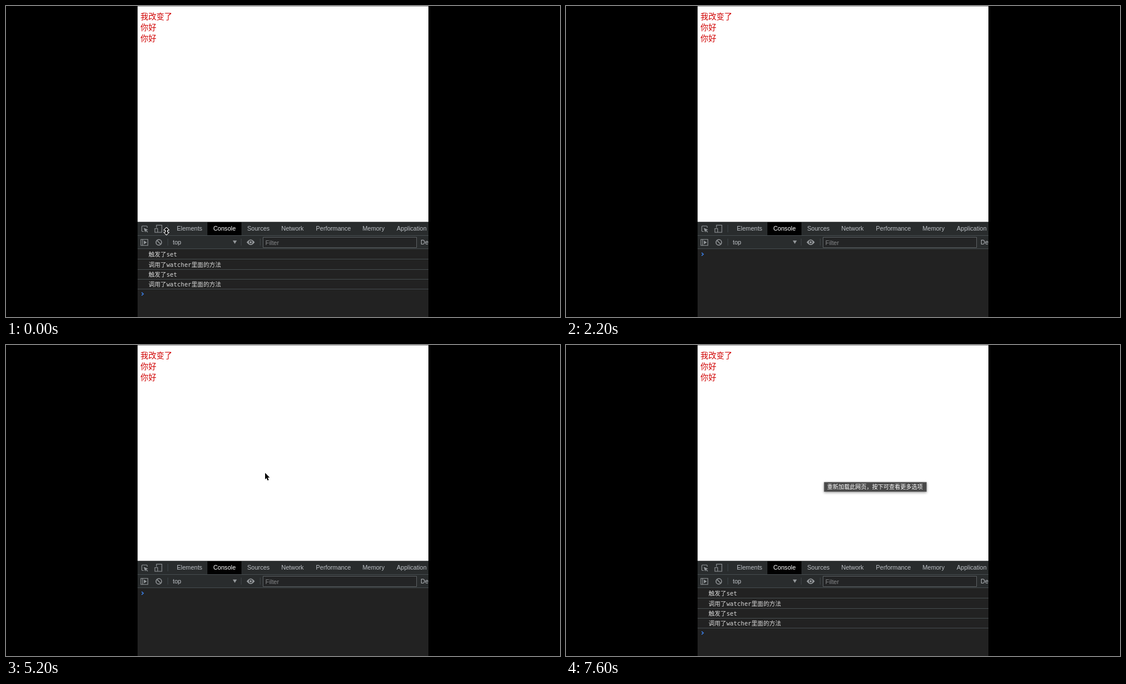
Animation of 960x540 px, one loop 8 s. Source, as an HTML page:

```html
<!DOCTYPE html>
<html lang="zh-CN">
<head>
<meta charset="utf-8">
<style>
html, body { margin: 0; width: 100%; height: 100%; overflow: hidden; background: #000; }
svg { display: block; width: 960px; height: 540px; }
text { white-space: pre; }
.page { font: 13.75px "Noto Sans CJK SC", "Noto Sans CJK", sans-serif; fill: #d00000; }
.num { font: 13.2px Inter, sans-serif; fill: #d00000; }
.ui { font: 10.6px "Liberation Sans", Arial, sans-serif; fill: #bdc1c6; }
.log { font: 10.3px "DejaVu Sans Mono", "Noto Sans CJK SC", "Noto Sans CJK", monospace; fill: #d6d6d6; }
.tip { font: 9.75px "Noto Sans CJK SC", "Noto Sans CJK", sans-serif; fill: #fff; }
.icon { fill: none; stroke: #94989b; stroke-width: 1.1; }
.line { fill: none; stroke: #454b4e; }
</style>
</head>
<body>
<svg viewBox="0 0 960 540">
  <defs>
    <clipPath id="win"><path d="M228 0H732V540H228Z"/></clipPath>
    <filter id="shade" x="-20%" y="-60%" width="140%" height="240%">
      <feDropShadow dx="0" dy="1.5" stdDeviation="2" flood-opacity=".4"/>
    </filter>
  </defs>
  <g clip-path="url(#win)">
    <path fill="#fff" d="M228 0H732V375H228Z"/>
    <path fill="#999" d="M228 0H732V1H228Z"/>
    <g id="after" class="page">
      <text x="233" y="23">我改变了</text>
      <text x="233" y="61">你好</text>
    </g>
    <g id="before">
      <text class="num" x="233" y="22.5">3;33</text>
      <text class="num" x="233" y="60.5">333</text>
    </g>
    <text class="page" x="233" y="42">你好</text>

    <path fill="#222" d="M228 375H732V540H228Z"/>
    <path fill="#292c2d" d="M228 375H732V421H228Z"/>
    <path fill="#c8c8c8" d="M228 374H732V375H228Z"/>
    <path fill="#000" d="M349 375.5H408V398H349Z"/>
    <path class="line" d="M228 398.5H732M228 421.5H732"/>
    <path class="line" stroke-width=".8" d="M280.5 380V393M280.5 404V416M407.5 404V416M440.5 404V416"/>
    <g id="tabs"></g>

    <g class="icon">
      <path d="M238.5 391.5H236.5Q235.3 391.5 235.3 390.3V383.2Q235.3 382 236.5 382H243.5Q244.7 382 244.7 383.2V385"/>
      <path fill="#94989b" stroke="none" d="M238.5 385.2L246.2 388.4 243.2 389.5 246 392.3 245 393.2 242.2 390.4 241.2 393.2Z"/>
      <path d="M260.8 385V380.5H270V393H263.5M258 386.5H262.8V393H258Z"/>
      <path d="M233.8 405.2H245.8V415.8H233.8ZM236.8 405V416"/>
      <path fill="#94989b" stroke="none" d="M239 407.3L244 410.5 239 413.7Z"/>
      <g stroke-width="1.5"><circle cx="264.8" cy="410.4" r="4.8"/><path d="M261.4 407L268.2 413.8"/></g>
      <path fill="#94989b" stroke="none" d="M393 407.2H400L396.5 413Z"/>
      <path fill="#94989b" stroke="none" d="M417 410.2Q424 400.8 431 410.2Q424 419.6 417 410.2Z"/>
      <circle cx="424" cy="410.2" r="2.5" stroke="#292c2d" stroke-width="1.2"/>
    </g>
    <text class="ui" x="289" y="413.7">top</text>
    <path fill="#232425" stroke="#5b6063" d="M445.5 401.5H711.5V419.5H445.5Z"/>
    <text class="ui" x="449.5" y="414.5" style="fill:#858789">Filter</text>
    <text class="ui" x="718.5" y="413.7">Default levels</text>

    <g id="logs"></g>
    <path id="prompt" fill="none" stroke="#3b7de0" stroke-width="1.5" d="M235 -2.6L238 0 235 2.6"/>

    <g id="tip">
      <path filter="url(#shade)" fill="#4a4a4a" stroke="#606060" stroke-width=".6" d="M447.3 238.3H624.7V254.5H447.3Z"/>
      <text class="tip" x="452.5" y="250">重新加载此网页，按下可查看更多选项</text>
    </g>

    <g stroke-linejoin="round">
      <path id="arrow" stroke="#fff" stroke-width=".9" paint-order="stroke" d="M0 0V11.2L2.5 9 4.3 13.2 6.3 12.3 4.5 8.2H8Z"/>
      <path id="resize" stroke="#fff" stroke-width="1.8" paint-order="stroke" d="M0 -6L4 -2H1V2H4L0 6 -4 2H-1V-2H-4Z"/>
      <path id="hand" fill="#fff" stroke="#111" stroke-width=".8" d="M-3 -5Q-2.6 -6.5 -1.2 -5.6L.3 -1.8Q1.5 -2.8 2.4 -1.4Q3.6 -2.2 4.3 -.8Q5.6 -1.2 5.8 .4L5.4 3.8 4.4 6.4H-1L-4.6 1.8Q-5 .2 -3.4 .5L-1.7 1.7Z"/>
    </g>
  </g>
</svg>
<script>
const $ = id => document.getElementById(id);
const show = (id, on) => $(id).setAttribute('visibility', on ? 'visible' : 'hidden');
const move = (id, x, y) => $(id).setAttribute('transform', `translate(${x} ${y})`);

const tabs = { Elements: 296, Console: 359.2, Sources: 418, Network: 477, Performance: 537, Memory: 617.7, Application: 677 };
$('tabs').innerHTML = Object.entries(tabs).map(([name, x]) =>
  `<text class="ui" x="${x}" y="390.2"${name === 'Console' ? ' style="fill:#fff"' : ''}>${name}</text>`).join('');

const messages = ['触发了set', '调用了watcher里面的方法'];
$('logs').innerHTML = [0, 1, 2, 3].map(i => {
  const y = 435.3 + i * 17.3;
  return `<text class="log" x="247" y="${y}">${messages[i % 2]}</text>
    <path class="line" d="M228 ${Math.round(y + 4) + .5}H732"/>`;
}).join('');

// Pointer stops: time, x, y
const path = [
  [0, 278, 391], [400, 278, 394], [800, 277, 412], [1000, 268, 414], [1200, 268, 414],
  [1800, 292, 6], [2000, 292, -30], [3400, 290, -30], [3600, 370, 130],
  [3800, 425.7, 215.5], [4600, 449, 222], [8000, 449, 222]
];

function pointerAt(t) {
  const i = path.findIndex(p => p[0] > t);
  const [t0, x0, y0] = path[i - 1], [t1, x1, y1] = path[i];
  const k = (t - t0) / (t1 - t0);
  return [x0 + (x1 - x0) * k, y0 + (y1 - y0) * k];
}

function draw(now) {
  const t = Math.floor(now % 8000 / 200) * 200;
  const reloaded = t >= 2600 && t < 5200;
  const logged = t < 1000 || t >= 5400;
  show('before', reloaded);
  show('after', !reloaded);
  show('logs', logged);
  move('prompt', 0, logged ? 500 : 431);
  show('tip', t >= 6000);

  const [x, y] = pointerAt(t);
  const kind = t >= 7600 ? '' : y > 398 ? 'hand' : t < 1200 ? 'resize' : 'arrow';
  for (const id of ['arrow', 'resize', 'hand']) {
    show(id, id === kind);
    move(id, x, y);
  }
}

const start = performance.now();
function tick() {
  draw(performance.now() - start);
  requestAnimationFrame(tick);
}
tick();
</script>
</body>
</html>
```
